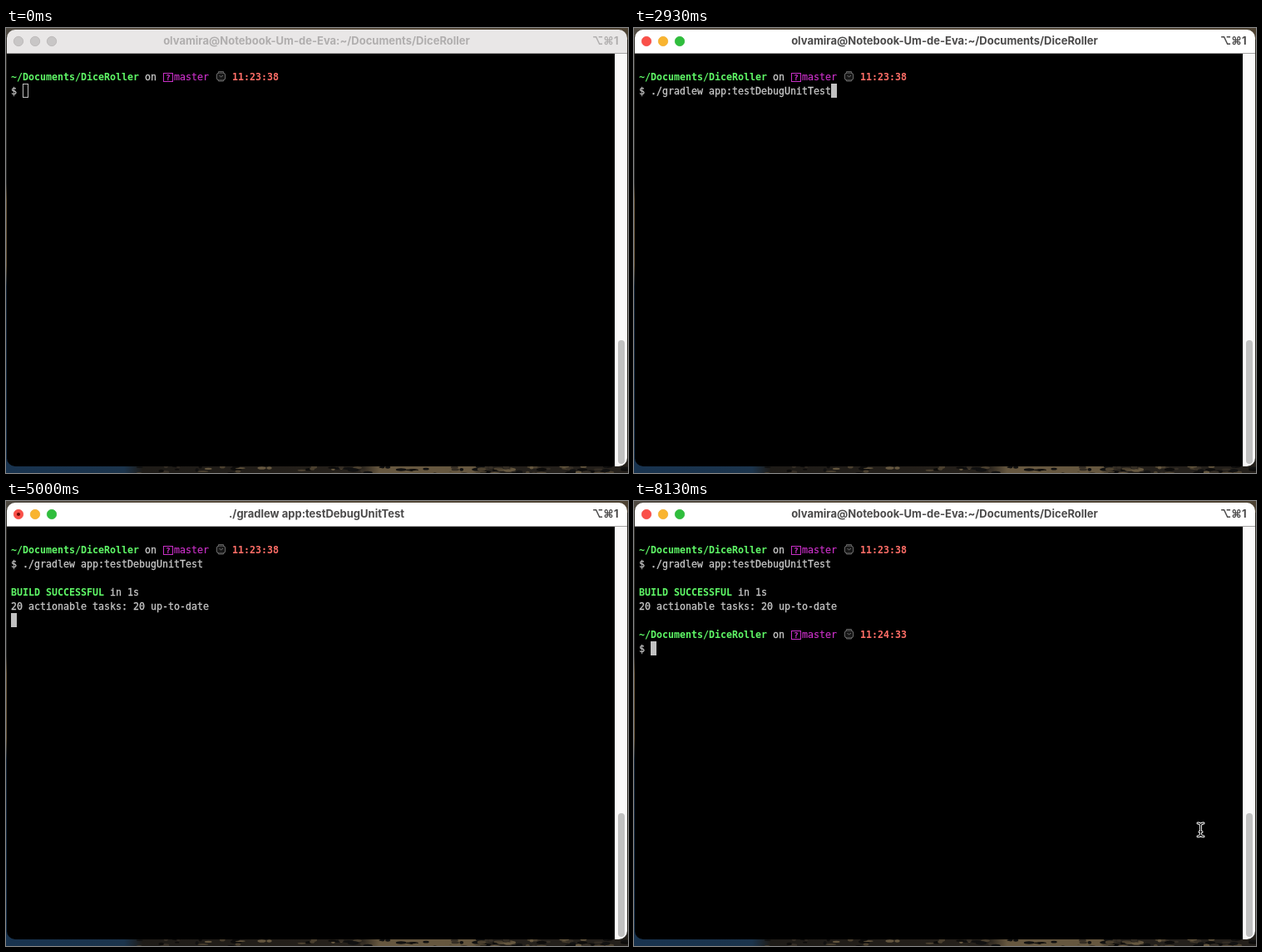
These frames come from a looping animation (748x536 px, 8.87 s). An HTML page:

```html
<!DOCTYPE html>
<html lang="en">
<head>
<meta charset="utf-8">
<title>Terminal</title>
<style>
html, body { margin: 0; width: 100%; height: 100%; overflow: hidden; background: #17212c; }
svg { display: block; width: 748px; height: 536px; }
text { white-space: pre; }
.bar { font: 700 13px Inter, "Liberation Sans", sans-serif; }
.term { font: 11.63px "DejaVu Sans Mono", "Liberation Mono", monospace; fill: #c7c7c7; }
.plain { stroke: #c7c7c7; stroke-width: .3; }
.green { fill: #5ff967; font-weight: 700; }
.pink { fill: #c930c7; stroke: #c930c7; stroke-width: .2; }
.red { fill: #ff6e67; font-weight: 700; }
.white { fill: #feffff; font-weight: 700; }
</style>
</head>
<body>
<svg viewBox="0 0 748 536" xmlns="http://www.w3.org/2000/svg">
  <defs>
    <linearGradient id="top">
      <stop offset="0" stop-color="#4f4a42"/><stop offset=".27" stop-color="#5a4e3e"/>
      <stop offset="1" stop-color="#4d4232"/>
    </linearGradient>
    <linearGradient id="side" x2="0" y2="1">
      <stop offset="0" stop-color="#33302b"/><stop offset=".34" stop-color="#2b2c2c"/>
      <stop offset=".38" stop-color="#6a573b"/><stop offset=".53" stop-color="#6a573b"/>
      <stop offset=".58" stop-color="#14263a"/><stop offset="1" stop-color="#1a3654"/>
    </linearGradient>
    <linearGradient id="low">
      <stop offset="0" stop-color="#18334f"/><stop offset=".19" stop-color="#1b344c"/>
      <stop offset=".22" stop-color="#1e1b17"/><stop offset=".57" stop-color="#26211b"/>
      <stop offset=".6" stop-color="#66573f"/><stop offset=".75" stop-color="#66573f"/>
      <stop offset=".78" stop-color="#24201b"/><stop offset="1" stop-color="#24201b"/>
    </linearGradient>
    <clipPath id="frame"><rect x="1" y="2" width="746" height="526" rx="10"/></clipPath>
    <path id="beam" d="M-3.5-8C-1-8 0-7 0-5V5C0 7-1 8-3.5 8M3.5-8C1-8 0-7 0-5M0 5C0 7 1 8 3.5 8M-1.5 2.5H1.5"/>
  </defs>
  <rect width="748" height="536" fill="#2b2721"/>
  <rect width="748" height="14" fill="url(#top)"/>
  <rect y="10" width="10" height="520" fill="url(#side)"/>
  <rect y="518" width="748" height="18" fill="url(#low)"/>
  <g id="rocks"></g>
  <g clip-path="url(#frame)">
    <rect y="30" width="748" height="500" fill="#000"/>
    <rect x="732" y="31" width="16" height="500" fill="#faf9f9"/>
    <rect x="732" y="31" width="1" height="500" fill="#e8e7e7"/>
    <rect x="736" y="376" width="8" height="149" rx="4" fill="#c1c1c1"/>
    <g id="bar"></g>
  </g>
  <g id="screen" class="term"></g>
  <g id="pointer" fill="none" stroke-linecap="round">
    <use href="#beam" stroke="#fff" stroke-width="3"/>
    <use href="#beam" stroke="#000" stroke-width="1.2"/>
  </g>
</svg>
<script>
const LOOP = 8870;
const HOME = 'olvamira@Notebook-Um-de-Eva:~/Documents/DiceRoller';
const COMMAND = './gradlew app:testDebugUnitTest';
const BAR = '<-------------> 0% ';

// Times of the hard changes
const FOCUS = 870, TYPED = 2070, ENTER = 3730, INIT = 4470, RESOLVE = 4670,
      FILES = 4730, DONE = 4930, TITLE = 5400, PROMPT = 5470;

// Pointer stops: time, x, y (no place means hidden)
const STOPS = [
  [0], [70, 690, 470], [130, 602, 382], [200, 543, 325], [400, 468, 321],
  [470, 403, 318], [800, 399.5, 318], [TYPED],
  [6870, 400, 318], [6930, 484, 317], [7000, 575.5, 316], [7070, 622, 320],
  [7130, 641, 325], [7330, 658, 352], [7400, 674, 382], [7470, 681.5, 396]
];

const $ = id => document.getElementById(id);
const esc = s => s.replace(/&/g, '&amp;').replace(/</g, '&lt;').replace(/>/g, '&gt;');
const colX = col => 6 + 7 * col;
const rowY = row => 50 + 17 * row;

function put(col, row, str, cls = 'plain') {
  return `<text class="${cls}" x="${colX(col)}" y="${rowY(row) + 13}">${esc(str)}</text>`;
}

function watch(x, y) {
  return `<g transform="translate(${x} ${y})" fill="none" stroke="#6f6f6f">
    <path d="M3 2.5V1H9V2.5M3 11.5V12.5H9V11.5" stroke="#5d5d5d"/>
    <rect x=".8" y="2.5" width="10.4" height="9" rx="3" fill="#161616"/>
    <path d="M4 5.5L6 7.5L8.5 5.5"/></g>`;
}

function prompt(row, time) {
  const y = rowY(row);
  return put(0, row, '~/Documents/DiceRoller', 'green') + put(23, row, 'on') +
    `<rect x="189.5" y="${y + 4.5}" width="11" height="10" fill="none" stroke="#c930c7"/>` +
    `<text class="pink" x="195" y="${y + 13}" text-anchor="middle" style="font-size:9px;font-weight:700">?</text>` +
    put(28, row, 'master', 'pink') + watch(252.5, y + 1.5) +
    put(38, row, time, 'red') + put(0, row + 1, '$');
}

function caret(col, row, solid) {
  const x = colX(col), y = rowY(row);
  return solid
    ? `<rect x="${x}" y="${y}" width="7" height="17" fill="#c1c1c1"/>`
    : `<rect x="${x + .5}" y="${y + .5}" width="6" height="16" fill="none" stroke="#c1c1c1"/>`;
}

function screen(t) {
  let out = prompt(0, '11:23:38');
  if (t < TYPED) return out + caret(2, 1, t >= FOCUS);
  out += put(2, 1, COMMAND);
  if (t < ENTER) return out + caret(2 + COMMAND.length, 1, true);
  if (t < INIT) return out + caret(0, 2, true);
  if (t < DONE) {
    const [phase, task] =
      t < RESOLVE ? ['INITIALIZING [62ms]', 'Evaluating settings'] :
      t < FILES ? ['CONFIGURING [148ms]', 'root project > Resolve dependencies of :classpath'] :
      ['CONFIGURING [208ms]', 'root project > Resolve files of :classpath'];
    return out + put(0, 2, BAR + phase, 'white') + put(0, 3, '> ' + task, 'white') + caret(0, 4, true);
  }
  out += put(0, 3, 'BUILD SUCCESSFUL', 'green') + put(17, 3, 'in 1s') +
    put(0, 4, '20 actionable tasks: 20 up-to-date');
  if (t < PROMPT) return out + caret(0, 5, true);
  return out + prompt(6, '11:24:33') + caret(2, 7, true);
}

function titleBar(t) {
  const on = t >= FOCUS;
  const busy = t >= ENTER && t < TITLE;
  const dot = t >= INIT && t < PROMPT;
  const lights = on
    ? [['#fa5049', '#f14842'], ['#f9b42f', '#efaa29'], ['#2fbe3c', '#2bb438']]
    : Array(3).fill(['#c8c6c6', '#b3b1b1']);
  const ink = on ? '#4b4a4a' : '#b0aeae';
  return `<rect width="748" height="30" fill="${on ? '#fff' : '#e9e7e7'}"/>
    <rect y="30" width="748" height="1" fill="#a4a3a3"/>` +
    lights.map(([fill, edge], i) =>
      `<circle cx="${15 + 20 * i}" cy="16" r="5.7" fill="${fill}" stroke="${edge}" stroke-width=".7"/>`).join('') +
    (dot ? '<circle cx="15" cy="16" r="2.1" fill="#6d0b08"/>' : '') +
    `<g class="bar" fill="${ink}"><text x="373.5" y="20" text-anchor="middle">${busy ? COMMAND : HOME}</text>
    <text x="736.5" y="19.5" text-anchor="end">⌥⌘1</text></g>`;
}

function rocks() {
  let seed = 7, out = '';
  const rnd = () => (seed = seed * 16807 % 2147483647) / 2147483647;
  const tones = ['#4b402f', '#0d0c0b', '#65573f', '#352e25', '#111'];
  for (let i = 0; i < 110; i++) {
    const x = 160 + rnd() * 588, y = 528 + rnd() * 9;
    const rx = 2 + rnd() * 5, ry = .8 + rnd() * 1.5;
    out += `<ellipse cx="${x}" cy="${y}" rx="${rx}" ry="${ry}" fill="${tones[i % 5]}"/>`;
  }
  return out;
}

const shown = {};
function set(id, markup) {
  if (shown[id] !== markup) $(id).innerHTML = shown[id] = markup;
}

function draw(t) {
  set('bar', titleBar(t));
  set('screen', screen(t));
  const [, x, y] = STOPS.filter(s => s[0] <= t).pop();
  const pointer = $('pointer');
  pointer.setAttribute('visibility', x === undefined ? 'hidden' : 'visible');
  if (x !== undefined) pointer.setAttribute('transform', `translate(${x} ${y})`);
}

function tick() {
  draw(performance.now() % LOOP);
  requestAnimationFrame(tick);
}

$('rocks').innerHTML = rocks();
tick();
</script>
</body>
</html>
```
